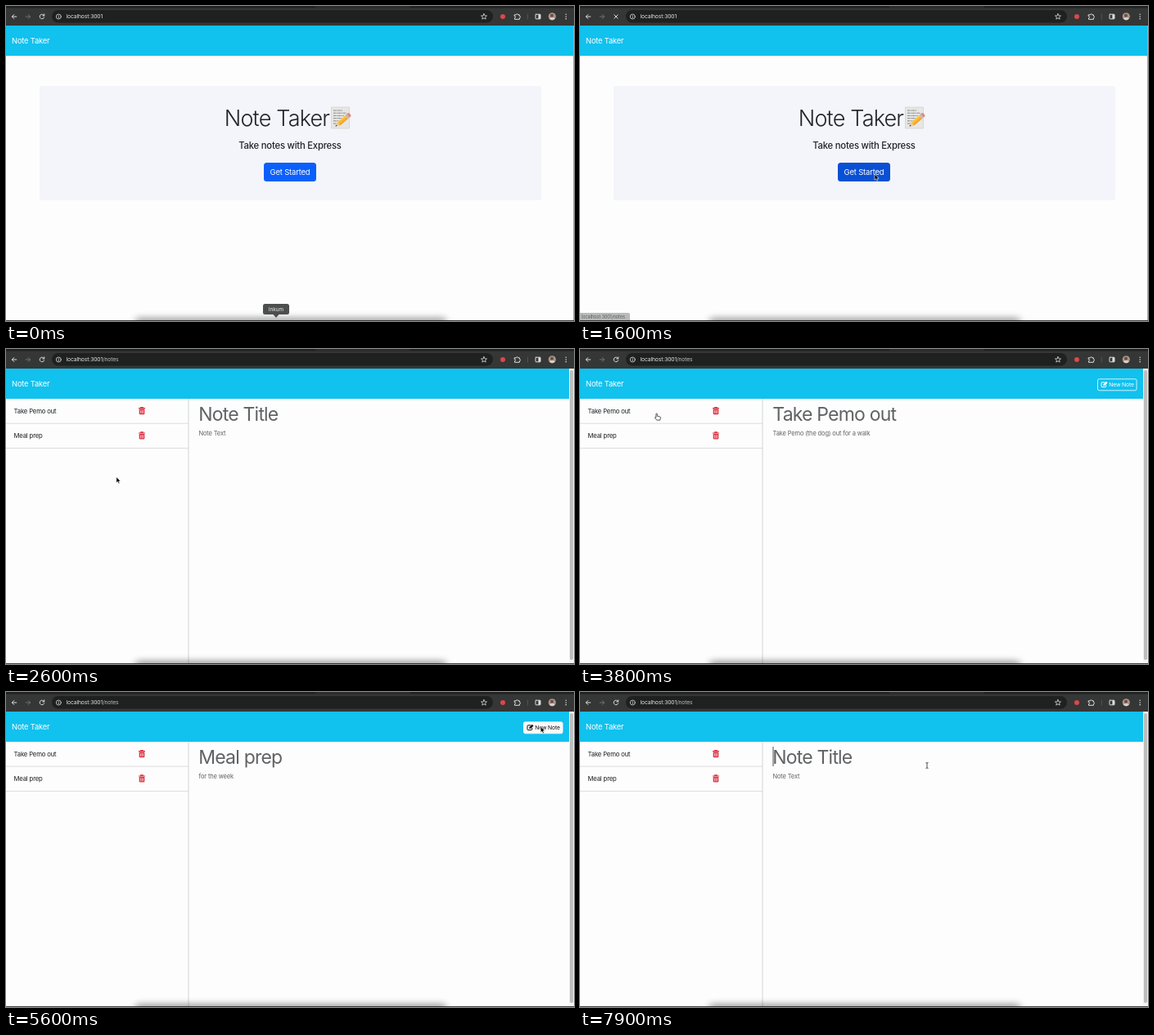
Recreate the animation shown at these times as an HTML page. Size 694 px wide and 386 px high, loop 8000 ms.

```html
<!DOCTYPE html>
<html lang="en">
<head>
<meta charset="utf-8">
<title>Note Taker</title>
<style>
html, body { margin: 0; width: 100%; height: 100%; overflow: hidden; background: #fdfdfd; }
svg { display: block; width: 100vw; height: 100vh; }
text { font-family: Inter, "Open Sans", sans-serif; letter-spacing: -.02em; white-space: pre; }
.ui { fill: none; stroke: #dcdcdc; stroke-width: 1; stroke-linecap: round; stroke-linejoin: round; }
.mid { text-anchor: middle; }
.item { font-size: 7.7px; fill: #1c1f22; }
.title { font-size: 23px; fill: #606264; letter-spacing: -.035em; }
.body { font-size: 7.5px; fill: #606264; }
</style>
</head>
<body>
<svg viewBox="0 0 694 386" preserveAspectRatio="none">
  <defs>
    <filter id="blur" x="-20%" y="-200%" width="140%" height="500%"><feGaussianBlur stdDeviation="5 3.5"/></filter>
    <linearGradient id="lead" x2="0" y2="1"><stop stop-color="#ffd257"/><stop offset="1" stop-color="#f19a1d"/></linearGradient>
    <g id="trash">
      <path d="M0 1.6H8M2.6 1.4V.5H5.4V1.4" fill="none" stroke="#dc3545" stroke-width="1.1"/>
      <path d="M.7 2.6H7.3V8.2Q7.3 9.2 6.3 9.2H1.7Q.7 9.2 .7 8.2Z" fill="#dc3545"/>
      <path d="M2.5 4V7.9M4 4V7.9M5.5 4V7.9" stroke="#fff" stroke-width=".6"/>
    </g>
  </defs>
  <rect width="694" height="386" fill="#fdfdfd"/>

  <g id="home">
    <rect y="24" width="694" height="37" fill="#11c1ee"/>
    <rect x="41" y="98" width="613" height="140" rx="2" fill="#f4f5fa"/>
    <text class="mid" x="331" y="147" font-size="27" font-weight="300" fill="#212529" style="letter-spacing:-.03em">Note Taker</text>
    <g id="memo">
      <path d="M397.5 124H419.5V150H397.5Z" fill="#e6e6e4" stroke="#c9c9c7" stroke-width=".6"/>
      <path d="M400 128H411M400 131.2H416M400 134.4H413M400 137.6H411M400 140.8H408M400 144H405" stroke="#85878a" stroke-width="1" stroke-dasharray="3 .7 1.6 .6"/>
      <g transform="translate(402.5 147.5) rotate(-40)">
        <path d="M0 0L5-2.8V2.8Z" fill="#eac99b"/>
        <path d="M0 0L1.9-1.1V1.1Z" fill="#333"/>
        <path d="M5-2.8H18V2.8H5Z" fill="url(#lead)"/>
        <path d="M18-2.8H20.3V2.8H18Z" fill="#b9bcc0"/>
        <path d="M20.3-2.8H22Q23.5-2.8 23.5 0T22 2.8H20.3Z" fill="#e8837c"/>
      </g>
    </g>
    <text class="mid" x="347" y="174.5" font-size="11.3" font-weight="500" fill="#212529">Take notes with Express</text>
    <rect id="start" x="315" y="192" width="64" height="23" rx="3.5"/>
    <text class="mid" x="347" y="207.3" font-size="9.5" fill="#fff">Get Started</text>
    <path d="M693.5 24V386" stroke="#a9a9a9"/>
  </g>

  <g id="notes">
    <rect y="24" width="688" height="37" fill="#11c1ee"/>
    <path d="M0 91.2H223M0 121.6H223" stroke="#d9dadc" stroke-width=".9"/>
    <path d="M223 61V386" stroke="#cfd1d3" stroke-width=".9"/>
    <text class="item" x="9.5" y="78.7">Take Pemo out</text>
    <text class="item" x="9.5" y="109.2">Meal prep</text>
    <use href="#trash" x="162" y="71"/>
    <use href="#trash" x="162" y="101.4"/>
    <text id="title" class="title" x="235.3" y="87.5"></text>
    <text id="body" class="body" x="235.5" y="105.8"></text>
    <path id="caret" d="M236 67V91" stroke="#222" stroke-width=".8"/>
    <g id="add">
      <rect id="addBox" x="632.5" y="36.8" width="47.6" height="14" rx="1.8" stroke="#fff" stroke-width=".8"/>
      <g id="addInk">
        <path d="M641.3 40.8H638Q637 40.8 637 41.8V45.6Q637 46.6 638 46.6H641.8Q642.8 46.6 642.8 45.6V44" fill="none" stroke="currentColor" stroke-width="1"/>
        <path d="M639.2 45.1L639.5 43.1L642.9 39.7L644.6 41.4L641.2 44.8Z" fill="currentColor"/>
        <text x="646.2" y="46.3" font-size="6.8" fill="currentColor">New Note</text>
      </g>
    </g>
    <rect x="688" y="24" width="6" height="362" fill="#f6f6f6"/>
    <rect x="688.9" y="26" width="4.2" height="355" rx="2.1" fill="#bdbdbd"/>
  </g>
  <text x="7" y="46" font-size="9.4" fill="#fff">Note Taker</text>

  <g id="chrome">
    <rect width="694" height="24" fill="#353636"/>
    <path d="M0 0H694V2.5H0Z" fill="#202222"/>
    <path d="M378 0H494V2.5H378Z" fill="#2b2d2d"/>
    <rect x="56" y="5" width="539" height="15.5" rx="7.7" fill="#1f2121"/>
    <path class="ui" d="M12.8 13H7.4M9.8 10.5L7.3 13L9.8 15.5"/>
    <path class="ui" d="M24.2 13H29.6M27.2 10.5L29.7 13L27.2 15.5" style="stroke:#717272"/>
    <path id="reload" class="ui" d="M46.5 11.6A2.8 2.8 0 1 0 46.7 13.8M46.8 9.9V11.9H44.8"/>
    <path id="stop" class="ui" d="M41.8 10.8L46.2 15.2M46.2 10.8L41.8 15.2"/>
    <circle class="ui" cx="64.3" cy="13" r="3" style="stroke-width:.8"/>
    <path class="ui" d="M64.3 12.8V14.5M64.3 11.3V11.4" style="stroke-width:.8"/>
    <text x="73.5" y="15.3" font-size="6.8" fill="#e3e3e3">localhost:3001<tspan id="path" fill="#bcbcbc">/notes</tspan></text>
    <path class="ui" d="M584 9.5L585 11.8L587.5 12L585.6 13.6L586.2 16.1L584 14.8L581.8 16.1L582.4 13.6L580.5 12L583 11.8Z" style="stroke-width:.8"/>
    <circle cx="607" cy="13" r="3" fill="#d9484b"/>
    <path class="ui" d="M621.5 10.8H623.4A1.1 1.1 0 0 1 625.6 10.8H627.4V12.4A1.1 1.1 0 0 1 627.4 14.6V16.3H621.5V14.6A1.1 1.1 0 0 0 621.5 12.4Z"/>
    <path d="M637.3 9.5V16.5" stroke="#5c5d5d" stroke-width=".8"/>
    <rect class="ui" x="647" y="10.2" width="6" height="5.6" rx=".6"/>
    <path d="M650.4 10.2H653V15.8H650.4Z" fill="#dcdcdc"/>
    <circle cx="667.3" cy="12.8" r="4.6" fill="#a8948c"/>
    <path d="M663.7 15.6Q667.3 11.8 670.9 15.6A4.6 4.6 0 0 1 663.7 15.6Z" fill="#d9cfcb"/>
    <circle cx="667" cy="11.8" r="2" fill="#6f4c40"/>
    <path d="M684.2 10.2V10.3M684.2 12.9V13M684.2 15.6V15.7" class="ui" style="stroke-width:1.5"/>
  </g>

  <rect x="158" y="381" width="380" height="14" rx="5" fill="#000" opacity=".3" filter="url(#blur)"/>
  <g id="status">
    <path d="M0 376H59Q61 376 61 378V386H0Z" fill="#b9bbbb"/>
    <text x="2" y="382.8" font-size="5.6" fill="#5b5d5d">localhost:3001/notes</text>
  </g>
  <path d="M0 385.6H694" stroke="#1b1b1b" stroke-width=".9"/>
  <g id="tip">
    <path d="M316.5 365H343.5Q346 365 346 367.5V375.5Q346 378 343.5 378H333.5L330 382L326.5 378H316.5Q314 378 314 375.5V367.5Q314 365 316.5 365Z" fill="#4d4e4e"/>
    <text class="mid" x="330" y="373.9" font-size="6.4" fill="#ececec" style="letter-spacing:0">Inkum</text>
  </g>

  <g id="cursor">
    <path id="arrow" d="M0 0V7.2L1.7 5.7L2.8 8.3L4.1 7.7L3 5.2H5.2Z" fill="#000" stroke="#fff" stroke-width=".6"/>
    <path id="hand" d="M-.7 .3Q0-.6 .7 .3V3L4.2 3.9Q5 4.2 4.8 5L4.2 8H.2L-2.2 4.9Q-2 3.8-.7 4.8Z" fill="#fff" stroke="#111" stroke-width=".7"/>
    <path id="beam" d="M-1.5-3.5Q0-3.5 0-2.5Q0-3.5 1.5-3.5M0-2.5V2.5M-1.5 3.5Q0 3.5 0 2.5Q0 3.5 1.5 3.5" fill="none" stroke="#222" stroke-width=".8"/>
  </g>
</svg>
<script>
const LOOP = 8000;
const $ = id => document.getElementById(id);
const show = (id, on) => $(id).style.display = on ? "" : "none";

// Pointer stops: time, x, y
const stops = [
  [0, 332, 390], [300, 342, 340], [700, 347, 256], [950, 347, 256], [1300, 360, 206],
  [1800, 360, 206], [2000, 236, 226], [2200, 195, 209], [2300, 195, 209], [2600, 135, 157],
  [2900, 94, 78], [3750, 94, 77], [4050, 89, 105], [4500, 89, 105], [4800, 98, 154],
  [5050, 330, 118], [5400, 640, 46], [5700, 655, 42], [6900, 655, 42], [7250, 560, 88],
  [7600, 424, 90], [LOOP, 424, 90]
];

// Cubic path with slopes that vanish at turning points
function slope(i, k) {
  const a = stops[i - 1], b = stops[i], c = stops[i + 1];
  if (!a || !c) return 0;
  const l = (b[k] - a[k]) / (b[0] - a[0]), r = (c[k] - b[k]) / (c[0] - b[0]);
  return l * r <= 0 ? 0 : 2 * l * r / (l + r);
}
function pointer(t) {
  let i = 0;
  while (i < stops.length - 2 && t >= stops[i + 1][0]) i++;
  const a = stops[i], b = stops[i + 1], d = b[0] - a[0], u = (t - a[0]) / d, v = 1 - u;
  return [1, 2].map(k =>
    a[k] * (1 + 2 * u) * v * v + b[k] * u * u * (3 - 2 * u) +
    d * u * v * (slope(i, k) * v - slope(i + 1, k) * u));
}

function note(t) {
  if (t >= 3000 && t < 4200) return ["Take Pemo out", "Take Pemo (the dog) out for a walk"];
  if (t >= 4200 && t < 7000) return ["Meal prep", "for the week"];
  return ["Note Title", "Note Text"];
}

function draw(t) {
  const [x, y] = pointer(t);
  const onNotes = t >= 1700, opened = t >= 3000 && t < 7000;
  const overStart = !onNotes && x > 315 && x < 379 && y > 192 && y < 215;
  const overAdd = x > 632 && x < 680 && y > 37 && y < 51;

  show("home", !onNotes);
  show("notes", onNotes);
  show("path", onNotes);
  show("tip", t < 200);
  show("status", overStart);
  const loading = t >= 1500 && t < 1800;
  show("reload", !loading);
  show("stop", loading);
  $("start").setAttribute("fill", overStart ? "#0a50d4" : "#0b5ffb");

  const [title, body] = note(t);
  $("title").textContent = title;
  $("body").textContent = body;
  show("caret", t >= 7800);
  show("add", opened);
  $("addBox").setAttribute("fill", overAdd ? "#f8f9fa" : "none");
  $("addInk").style.color = overAdd ? "#111" : "#fff";

  const hand = onNotes && x < 223 && y > 61 && y < 121;
  const beam = onNotes && x > 235 && x < 688 && y > 66;
  show("hand", hand);
  show("beam", beam);
  show("arrow", !hand && !beam);
  $("cursor").setAttribute("transform", `translate(${x.toFixed(2)} ${y.toFixed(2)})`);
}

const start = performance.now();
function tick() {
  draw((performance.now() - start) % LOOP);
  requestAnimationFrame(tick);
}
tick();
</script>
</body>
</html>
```
